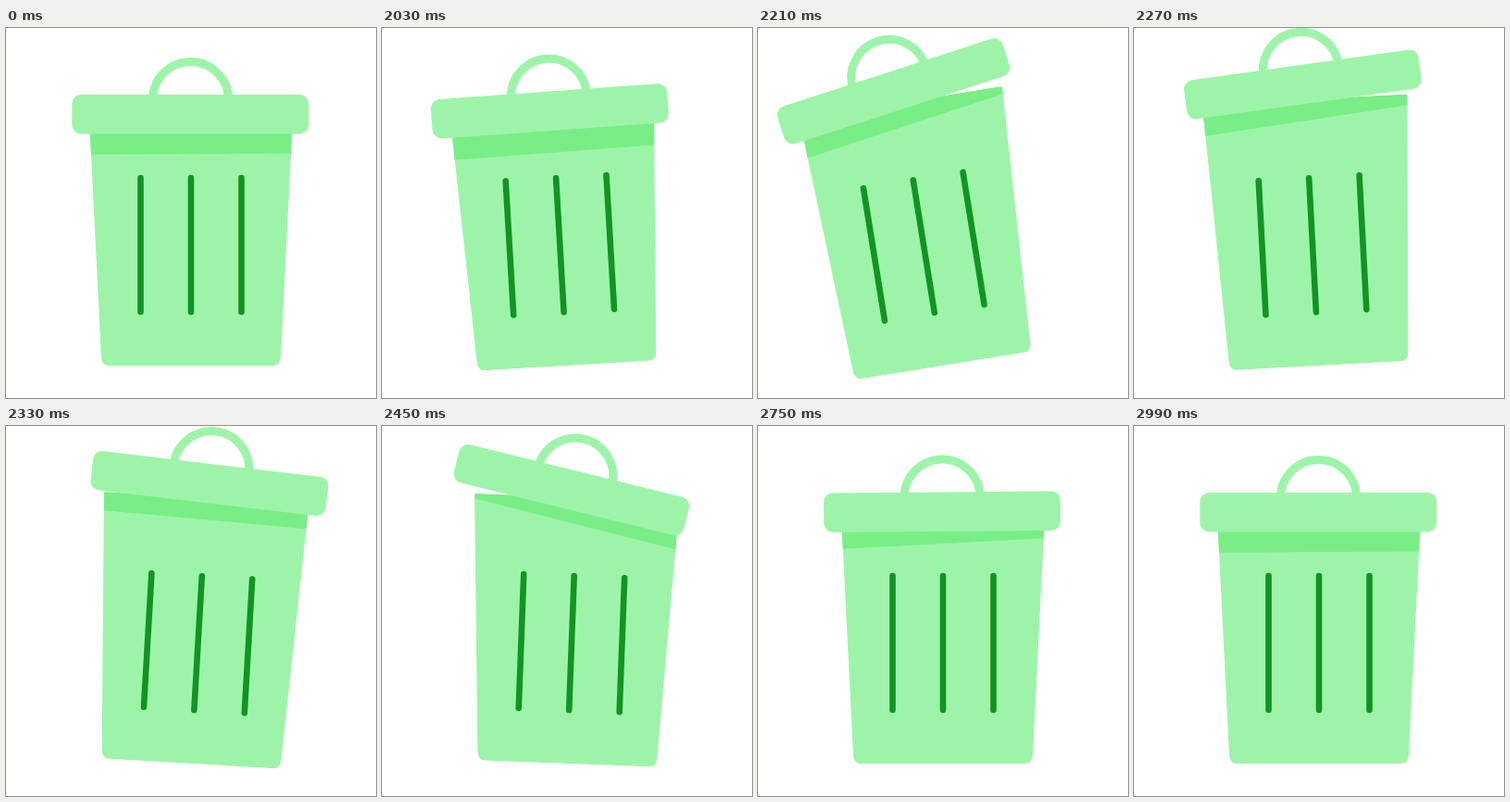
Animation, 400 px wide and 400 px high, one loop 3.02 s. Source, as an HTML page:

```html
<!DOCTYPE html>
<html lang="en">
<head>
<meta charset="utf-8">
<title>Rattling bin</title>
<style>
  html, body { margin: 0; width: 100%; height: 100%; overflow: hidden; background: #fff; }
  svg { display: block; width: 100%; height: 100%; }
</style>
</head>
<body>
<svg viewBox="0 0 400 400">
  <defs>
    <clipPath id="inside">
      <path d="M91 77H309Q311 77 310.9 79L297 356Q296.5 365 288 365H112Q103.5 365 103 356L89.1 79Q89 77 91 77Z"/>
    </clipPath>
  </defs>
  <g id="bin">
    <g clip-path="url(#inside)">
      <rect width="400" height="400" fill="#9df4a9"/>
      <rect id="shade" x="-100" y="-164" width="600" height="300.3" fill="#7aee86"/>
    </g>
    <path d="M145.5 162V307M200 162V307M254.5 162V307" stroke="#129422" stroke-width="6.6" stroke-linecap="round"/>
    <g id="lid">
      <path d="M158.5 77.5A41 41 0 0 1 240.5 77.5" fill="none" stroke="#9df4a9" stroke-width="9"/>
      <rect x="71.3" y="72" width="256" height="42.5" rx="10" fill="#9df4a9"/>
    </g>
  </g>
</svg>
<script>
const LOOP = 3020, START = 2000, STEP = 30;

// Smooth step from 0 to 1; kick is the speed at the start.
const ease = (u, kick) => u * u * (3 - 2 * u) + kick * u * (1 - u) ** 2;

// Swings from rest through turning points [ms, value]; only the first swing is kicked.
function swing(t, kick, ...turns) {
  let time = 0, value = 0;
  for (const [end, target] of turns) {
    if (t < end) return value + (target - value) * ease((t - time) / (end - time), kick);
    [time, value, kick] = [end, target, 0];
  }
  return value;
}

// The shade follows the lid's flapping, a little later and slower.
const hop = (t, kick, height, peak, end) => swing(t, kick, [peak, height], [end, 0]);
const flap = (t, peak, end) => swing(t, 0.25, [210, -8.8], [peak, 12.4], [600, -4.1], [end, 0]);

const [bin, shade, lid] = ['bin', 'shade', 'lid'].map(id => document.getElementById(id));

function place(part, x, y, angle, pivot) {
  part.setAttribute('transform', `translate(${x} ${y}) rotate(${angle} ${pivot})`);
}

function draw(ms) {
  const t = Math.max(0, Math.floor((ms % LOOP - START) / STEP) * STEP);
  const sway = swing(t, 2.5, [190, -9.7], [355, 4.2], [550, 0]);
  const slide = swing(t, 2.3, [190, -5.5], [335, 3], [455, -5.7], [790, 0]);
  place(bin, 0, 0, sway, '200 365');
  place(lid, slide, -hop(t, 1.05, 32.8, 275, 790), flap(t, 428, 790), '199.3 93.2');
  place(shade, 0, -hop(t, 0.25, 36.5, 258, 990), flap(t, 445, 990) - 0.25, '200 136.3');
}

const begin = performance.now();
function frame() {
  draw(performance.now() - begin);
  requestAnimationFrame(frame);
}
frame();
</script>
</body>
</html>
```
